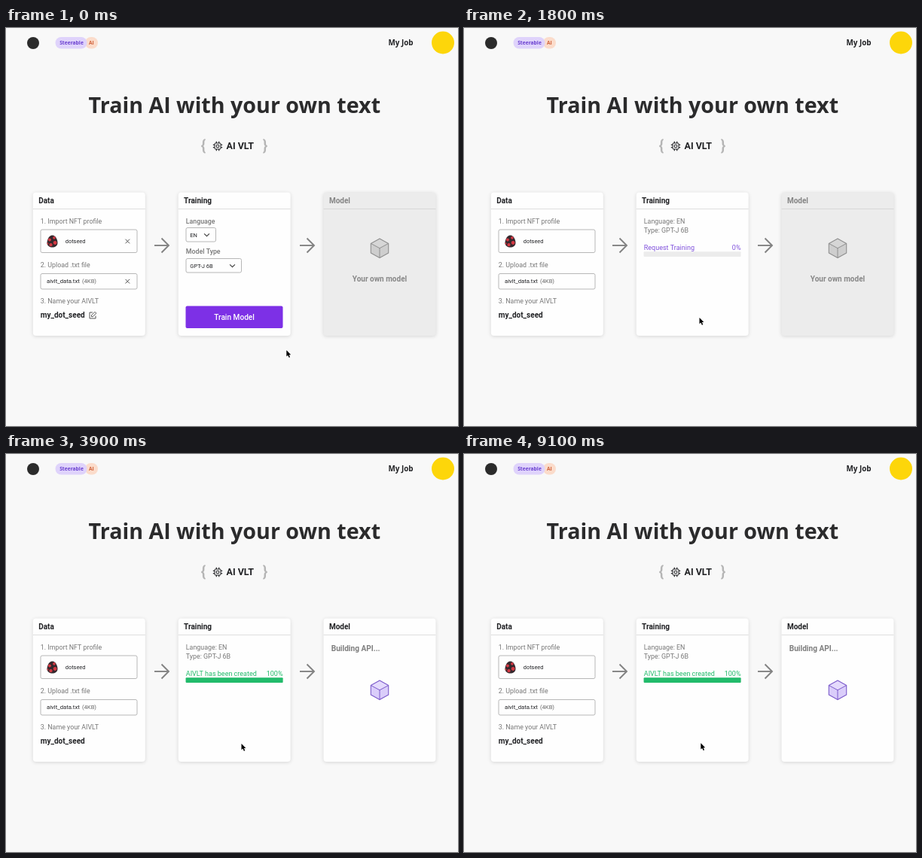
Animation, 600 px wide and 529 px high, one loop 9200 ms. Source, as an HTML page with a canvas:

```html
<!DOCTYPE html>
<html lang="en">
<head>
<meta charset="utf-8">
<title>Train AI with your own text</title>
<style>
  html, body { margin: 0; width: 100%; height: 100%; overflow: hidden; background: #f8f8f8; }
  canvas { display: block; width: 600px; height: 529px; }
</style>
</head>
<body>
<canvas id="stage"></canvas>
<script>
const W = 600, H = 529, LOOP = 9200, STEP = 100;
const canvas = document.getElementById('stage');
const ctx = canvas.getContext('2d');
const ratio = window.devicePixelRatio || 1;
canvas.width = W * ratio;
canvas.height = H * ratio;

const UI = 'Roboto, sans-serif';
const BRAND = '"Open Sans", sans-serif';
const INK = '#202124', GRAY = '#777', PURPLE = '#8052dc', GREEN = '#22bb6b';

// Times at which the interface changes state.
const SUBMIT = 800, FILL_START = 3300, FILL_END = 3700, BUILD = 3900;

const clamp = v => Math.max(0, Math.min(1, v));
const mix = (a, b, p) => a + (b - a) * p;
const smooth = p => p * p * (3 - 2 * p);

function text(str, x, y, size, color, weight = 400, align = 'left', family = UI) {
  ctx.font = `${weight} ${size}px ${family}`;
  ctx.textAlign = align;
  ctx.fillStyle = color;
  ctx.fillText(str, x, y);
}

function rounded(x, y, w, h, r, fill, stroke) {
  ctx.beginPath();
  ctx.roundRect(x, y, w, h, r);
  if (fill) { ctx.fillStyle = fill; ctx.fill(); }
  if (stroke) { ctx.strokeStyle = stroke; ctx.lineWidth = 1; ctx.stroke(); }
}

function disc(x, y, r, fill) {
  ctx.beginPath();
  ctx.arc(x, y, r, 0, Math.PI * 2);
  ctx.fillStyle = fill;
  ctx.fill();
}

function trace(points, close) {
  ctx.beginPath();
  points.forEach(([x, y]) => ctx.lineTo(x, y));
  if (close) ctx.closePath();
}

function line(points, color, width = 1, close = false) {
  trace(points, close);
  ctx.strokeStyle = color;
  ctx.lineWidth = width;
  ctx.stroke();
}

function shape(points, fill) {
  trace(points, true);
  ctx.fillStyle = fill;
  ctx.fill();
}

function header() {
  disc(36, 20, 8, '#2b2b2b');
  rounded(105, 12, 17, 15.5, 7.7, '#fbdccb');
  rounded(65.5, 12, 42, 15.5, 7.7, '#dfd3fb');
  text('Steerable', 87, 22, 6.7, '#6a3fd0', 700, 'center', BRAND);
  text('AI', 113.3, 22, 6.7, '#d0623b', 700, 'center', BRAND);
  text('My Job', 524, 23.2, 9.9, INK, 700, 'center', BRAND);
  disc(580, 19.5, 15, '#fdd60a');
}

function chip(x, y) {
  rounded(x - 4, y - 4, 8, 8, 1, null, INK);
  rounded(x - 1.7, y - 1.7, 3.4, 3.4, 0.3, null, INK);
  for (const d of [-1.7, 1.7]) {
    for (const s of [-1, 1]) {
      line([[x + d, y + s * 4], [x + d, y + s * 6.2]], INK, 1.2);
      line([[x + s * 4, y + d], [x + s * 6.2, y + d]], INK, 1.2);
    }
  }
}

function heading() {
  text('Train AI with your own text', 303.3, 112.5, 28.65, '#2b2b2c', 700, 'center', BRAND);
  text('{', 262, 163, 19.5, '#b5b5b5', 700, 'center');
  text('}', 344, 163, 19.5, '#b5b5b5', 700, 'center');
  chip(281, 157);
  text('AI VLT', 292.5, 161.3, 12.5, INK, 700);
}

function card(x, title, active = true) {
  ctx.save();
  ctx.shadowColor = 'rgba(0,0,0,.14)';
  ctx.shadowBlur = 5 * ratio;
  ctx.shadowOffsetY = ratio;
  rounded(x, 218.5, 149, 190.5, 4, active ? '#fefefe' : '#ececec');
  ctx.restore();
  line([[x, 240.5], [x + 149, 240.5]], active ? '#dedede' : '#d7d7d7');
  text(title, x + 7.4, 233, 10, active ? INK : '#858585', 700);
}

function flowArrow(x) {
  line([[x, 289], [x + 18.5, 289]], '#828282', 1.9);
  line([[x + 9.5, 279.5], [x + 19, 289], [x + 9.5, 298.5]], '#828282', 1.9);
}

function cross(x, y) {
  line([[x - 2.8, y - 2.8], [x + 2.8, y + 2.8]], '#555');
  line([[x - 2.8, y + 2.8], [x + 2.8, y - 2.8]], '#555');
}

function chevron(x, y) {
  line([[x - 3.4, y - 1.7], [x, y + 1.7], [x + 3.4, y - 1.7]], '#444', 1.2);
}

function egg(x, y) {
  ctx.save();
  ctx.beginPath();
  ctx.moveTo(x, y - 8);
  ctx.bezierCurveTo(x + 5, y - 8, x + 7, y - 1, x + 7, y + 2);
  ctx.bezierCurveTo(x + 7, y + 10, x - 7, y + 10, x - 7, y + 2);
  ctx.bezierCurveTo(x - 7, y - 1, x - 5, y - 8, x, y - 8);
  ctx.fillStyle = '#35282d';
  ctx.fill();
  ctx.clip();
  for (const [dx, dy, r] of [[-3.6, -2, 2], [2.4, -4.6, 1.8], [3.6, 2, 2.4], [-2, 4.6, 2.2], [-6.5, 3, 1.3]]) {
    disc(x + dx, y + dy, r, '#d43843');
  }
  ctx.restore();
}

function pencil(x, y) {
  line([[x + 5, y + 1], [x + 1, y + 1], [x + 1, y + 9], [x + 9, y + 9], [x + 9, y + 5.5]], '#555');
  line([[x + 3.5, y + 6.7], [x + 3.5, y + 4.8], [x + 8, y + 0.3], [x + 9.8, y + 2.1], [x + 5.2, y + 6.7]], '#555', 1, true);
}

function dataCard(editable) {
  card(35.8, 'Data');
  text('1. Import NFT profile', 45.8, 260, 8.85, GRAY);
  rounded(46, 268, 128, 30.5, 2, null, '#b7b7b7');
  egg(61.5, 283.5);
  text('dotseed', 78.8, 286, 7.4, INK);
  text('2. Upload .txt file', 45.8, 318, 8.85, GRAY);
  rounded(46, 326.5, 128, 20.5, 2, null, '#b7b7b7');
  text('aivlt_data.txt', 54, 339.3, 7.7, INK);
  text('(4KB)', 101, 339.3, 7.6, '#666');
  text('3. Name your AIVLT', 45.8, 366.3, 8.85, GRAY);
  text('my_dot_seed', 45.8, 385.3, 10, INK, 700);
  if (editable) {
    cross(161.3, 283.5);
    cross(161.3, 336.7);
    pencil(110, 377);
  }
}

function select(y, w, value) {
  rounded(239, y, w, 18.5, 2, null, '#b7b7b7');
  text(value, 244.3, y + 12, 7.5, INK);
  chevron(239 + w - 12, y + 9.5);
}

function trainingForm(hover) {
  text('Language', 238.8, 260, 8.8, GRAY, 500);
  select(265.5, 39.5, 'EN');
  text('Model Type', 238.8, 300.3, 8.8, GRAY, 500);
  select(306.5, 73.5, 'GPT-J 6B');
  const fill = `rgb(${mix(125, 93, hover)},${mix(48, 33, hover)},${mix(230, 206, hover)})`;
  rounded(238.5, 369.5, 129, 29.5, 2, fill);
  text('Train Model', 303, 387.6, 10.1, '#fff', 500, 'center');
}

function progressBar(fraction, color) {
  rounded(238.6, 297.2, 129 * fraction, 6.8, 1, color);
}

function trainingStatus(t) {
  const done = t > FILL_START;
  const color = done ? GREEN : PURPLE;
  text('Language: EN', 238.8, 260, 8.9, GRAY);
  text('Type: GPT-J 6B', 238.8, 272, 8.9, GRAY);
  text(done ? 'AIVLT has been created' : 'Request Training', 238.8, 294.5, 9, color);
  text(done ? '100%' : '0%', 367.5, 294.5, 9, color, 400, 'right');
  progressBar(1, '#ececec');
  const p = clamp((t - FILL_START) / (FILL_END - FILL_START));
  if (p > 0) progressBar(p, GREEN);
}

function cube(x, y, top, side, stroke) {
  const w = 11.7, h = 6.3, v = 12.8;
  const north = [x, y - v], east = [x + w, y - h], west = [x - w, y - h], south = [x, y + v];
  const hull = [north, east, [x + w, y + h], south, [x - w, y + h], west];
  shape(hull, side);
  shape([north, east, [x, y], west], top);
  ctx.lineJoin = 'round';
  line(hull, stroke, 1.1, true);
  line([west, [x, y], east], stroke);
  line([[x, y], south], stroke);
  ctx.lineJoin = 'miter';
}

function modelCard(active) {
  card(421.5, 'Model', active);
  if (active) {
    text('Building API...', 431.7, 261.5, 10.1, '#7f7f7f', 700);
    cube(496, 313.8, '#e4dafc', '#dacdfa', '#7c5bcb');
  } else {
    cube(496, 292.7, '#d6d6d6', '#cecece', '#8f8f8f');
    text('Your own model', 496, 337, 10, '#888', 700, 'center');
  }
}

function arrowCursor(x, y) {
  const outline = [[0, 0], [0, 8.3], [1.9, 6.6], [3.3, 9.8], [4.8, 9.2], [3.4, 6.1], [5.9, 6]]
    .map(([dx, dy]) => [x + dx, y + dy]);
  line(outline, '#fff', 1.4, true);
  shape(outline, '#000');
}

function handCursor(x, y) {
  const outline = [[-1, 0.3], [0, -0.6], [1, 0.3], [1.2, 3], [4.6, 4], [5.1, 5], [4.6, 8], [3.8, 10],
    [-0.7, 10], [-3.8, 6.2], [-3.3, 5.1], [-2.2, 5.3], [-1, 6.5]].map(([dx, dy]) => [x + dx, y + dy]);
  ctx.lineJoin = 'round';
  shape(outline, '#fff');
  line(outline, '#111', 1, true);
  ctx.lineJoin = 'miter';
  for (const d of [1.1, 2.7]) line([[x + d, y + 6], [x + d, y + 8.3]], '#111', 0.6);
}

// Small pointer drift late in the loop: time, x, y.
const drift = [[6800, 312.5, 385], [7200, 311.5, 385], [7400, 311.5, 385], [7600, 312.5, 385],
  [7800, 312.5, 385.5], [7900, 313.5, 386.5], [8100, 314.3, 384.3]];

function driftAt(t) {
  const next = drift.findIndex(([time]) => time > t);
  if (next === 0) return drift[0].slice(1);
  if (next < 0) return drift[drift.length - 1].slice(1);
  const a = drift[next - 1], b = drift[next];
  const p = (t - a[0]) / (b[0] - a[0]);
  return [mix(a[1], b[1], p), mix(a[2], b[2], p)];
}

function cursor(t) {
  if (t >= SUBMIT) return arrowCursor(...driftAt(t));
  const p = smooth(clamp(t / 500));
  const x = mix(372.3, 313, p), y = mix(428.3, 385.5, p);
  (y < 399 ? handCursor : arrowCursor)(x, y);
}

function draw(t) {
  ctx.setTransform(ratio, 0, 0, ratio, 0, 0);
  ctx.fillStyle = '#f8f8f8';
  ctx.fillRect(0, 0, W, H);
  header();
  heading();
  dataCard(t < SUBMIT);
  flowArrow(197);
  card(228.7, 'Training');
  if (t < SUBMIT) trainingForm(clamp((t - 300) / 200));
  else trainingStatus(t);
  flowArrow(390);
  modelCard(t >= BUILD);
  cursor(t);
}

const start = performance.now();
function tick() {
  const t = (performance.now() - start) % LOOP;
  draw(Math.floor(t / STEP) * STEP);
  requestAnimationFrame(tick);
}
tick();
</script>
</body>
</html>
```
